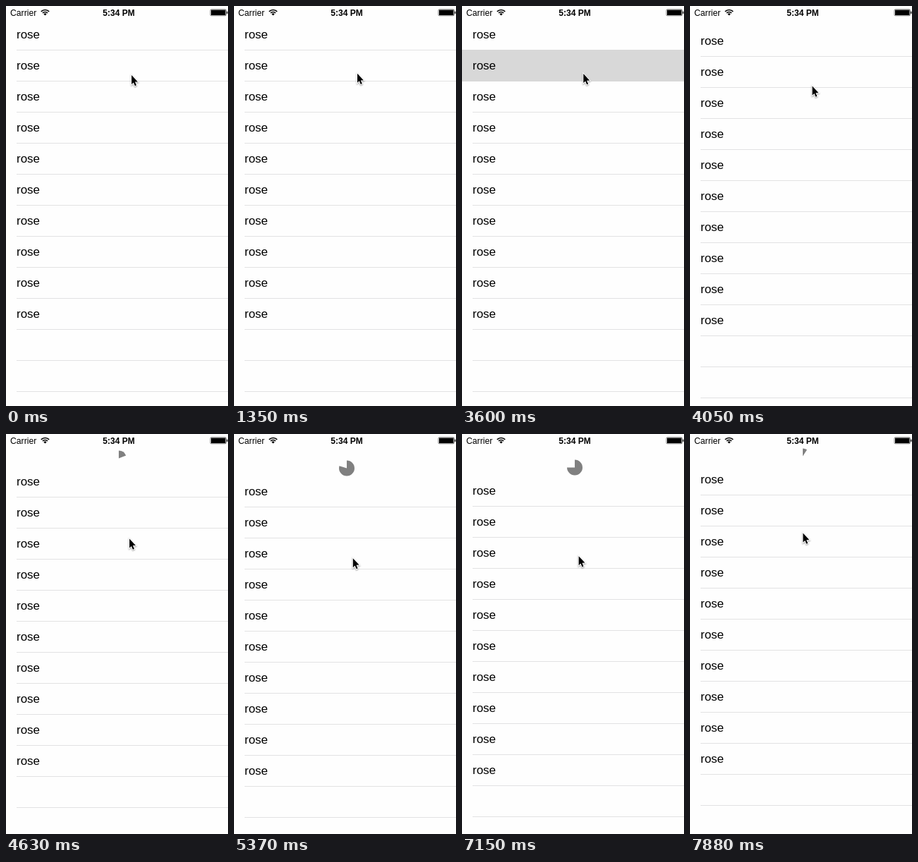
Recreate the animation shown at these times as an HTML page with a canvas. Size 315 by 567 pixels, loop 8 s.

```html
<!DOCTYPE html>
<html lang="en">
<head>
<meta charset="utf-8">
<title>Pull to refresh</title>
<style>
  html, body { margin: 0; width: 100%; height: 100%; overflow: hidden; background: #fefefe; }
  canvas { display: block; }
</style>
</head>
<body>
<canvas id="stage" width="315" height="567"></canvas>
<script>
const ctx = document.getElementById('stage').getContext('2d');
const W = 315, H = 567, LOOP = 8000;
const FONT = '"Liberation Sans", Arial, sans-serif';
const ROW = 44, PRESS = 3600, RETURN = 6700, RETURN_TIME = 1180;
const DRAG_RATIO = 1.94; // pointer travel per pixel of list travel

// Pointer resting point and its glides: start, end, x, y.
const REST = { x: 178.2, y: 99.2 };
const glides = [
  [150, 450, 175, 104],
  [900, 1200, 175, 92],
  [1200, 1350, 175, 97],
  [1500, 1950, 166, 92],
  [2100, 2700, 175.2, 96.2],
  [2700, 3000, 172, 88],
  [3000, 3300, 172.3, 97.3],
  [3600, 4630, 175.2, 97.3],
  [4630, 5370, 168.8, 97.8],
  [6700, 7880, 160.4, 95.2]
];

const clamp = v => Math.max(0, Math.min(1, v));

function stepTime(t) {
  const start = t < PRESS ? 0 : PRESS;
  const step = t < PRESS ? 150 : 147.65;
  return start + Math.floor((t - start) / step + 0.02) * step;
}

// Rubber-band pull that settles, then eases back.
function listOffset(t) {
  const held = Math.max(0, t - PRESS) / 1094;
  const pulled = 45.4 * (1 - Math.exp(-(held ** 1.74)));
  const returned = 21 * clamp((t - RETURN) / RETURN_TIME) ** 1.4;
  return Math.round(pulled - returned);
}

function pointerAt(t, offset) {
  let { x, y } = REST;
  for (const [start, end, toX, toY] of glides) {
    const u = clamp((t - start) / (end - start));
    x += (toX - x) * u;
    y += (toY - y) * u;
  }
  return [x, y + DRAG_RATIO * offset];
}

function text(str, x, y, font, align = 'left') {
  ctx.font = `${font} ${FONT}`;
  ctx.textAlign = align;
  ctx.fillStyle = '#000';
  ctx.fillText(str, x, y);
}

function drawStatusBar() {
  text('Carrier', 6, 14, '12.2px');
  text('5:34 PM', 160, 14, 'bold 12px', 'center');

  const top = -Math.PI / 2, spread = Math.PI / 4;
  ctx.strokeStyle = ctx.fillStyle = '#000';
  ctx.lineWidth = 1.7;
  for (const r of [5, 8]) {
    ctx.beginPath();
    ctx.arc(55.5, 13.5, r, top - spread, top + spread);
    ctx.stroke();
  }
  ctx.beginPath();
  ctx.moveTo(55.5, 13.5);
  ctx.arc(55.5, 13.5, 3, top - spread, top + spread);
  ctx.fill();

  ctx.lineWidth = 0.5;
  ctx.beginPath();
  ctx.roundRect(290, 4.8, 22.4, 9, 1.5);
  ctx.stroke();
  ctx.fillRect(291, 5.6, 20.5, 7.4);
  ctx.fillRect(313.2, 7.7, 1.2, 3.2);
}

function drawList(offset, pressed) {
  ctx.fillStyle = '#e2e2e3';
  for (let i = 0; i < 12; i++) ctx.fillRect(15, 62 + i * ROW + offset, 300, 1);
  if (pressed) {
    ctx.fillStyle = '#d8d8d8';
    ctx.fillRect(0, 62, W, 45);
  }
  for (let i = 0; i < 10; i++) text('rose', 15, 46 + i * ROW + offset, '17px');
}

function drawProgress(offset) {
  const portion = clamp((offset - 20) / 25) ** 1.3;
  const y = offset + 7.5, top = -Math.PI / 2;
  ctx.fillStyle = '#808080';
  ctx.beginPath();
  ctx.moveTo(160, y);
  ctx.arc(160, y, 11, top, top + portion * 2 * Math.PI);
  ctx.fill();
}

function drawPointer(x, y) {
  ctx.save();
  ctx.translate(x, y);
  ctx.beginPath();
  ctx.moveTo(0, -1.2);
  ctx.lineTo(0, 11.8);
  ctx.lineTo(2.8, 9.2);
  ctx.lineTo(4.8, 14);
  ctx.lineTo(6.8, 13.1);
  ctx.lineTo(4.8, 8.4);
  ctx.lineTo(8.8, 8.2);
  ctx.closePath();
  ctx.shadowColor = 'rgba(0,0,0,.4)';
  ctx.shadowBlur = 2;
  ctx.shadowOffsetY = 1;
  ctx.strokeStyle = '#fff';
  ctx.lineWidth = 2;
  ctx.stroke();
  ctx.shadowColor = 'transparent';
  ctx.fillStyle = '#000';
  ctx.fill();
  ctx.restore();
}

function draw(now) {
  const t = stepTime(now % LOOP);
  const offset = listOffset(t);
  ctx.fillStyle = '#fefefe';
  ctx.fillRect(0, 0, W, H);
  drawList(offset, t >= PRESS && offset === 0);
  drawProgress(offset);
  drawStatusBar();
  drawPointer(...pointerAt(t, offset));
}

const origin = performance.now();
function tick() {
  draw(performance.now() - origin);
  requestAnimationFrame(tick);
}
tick();
</script>
</body>
</html>
```
